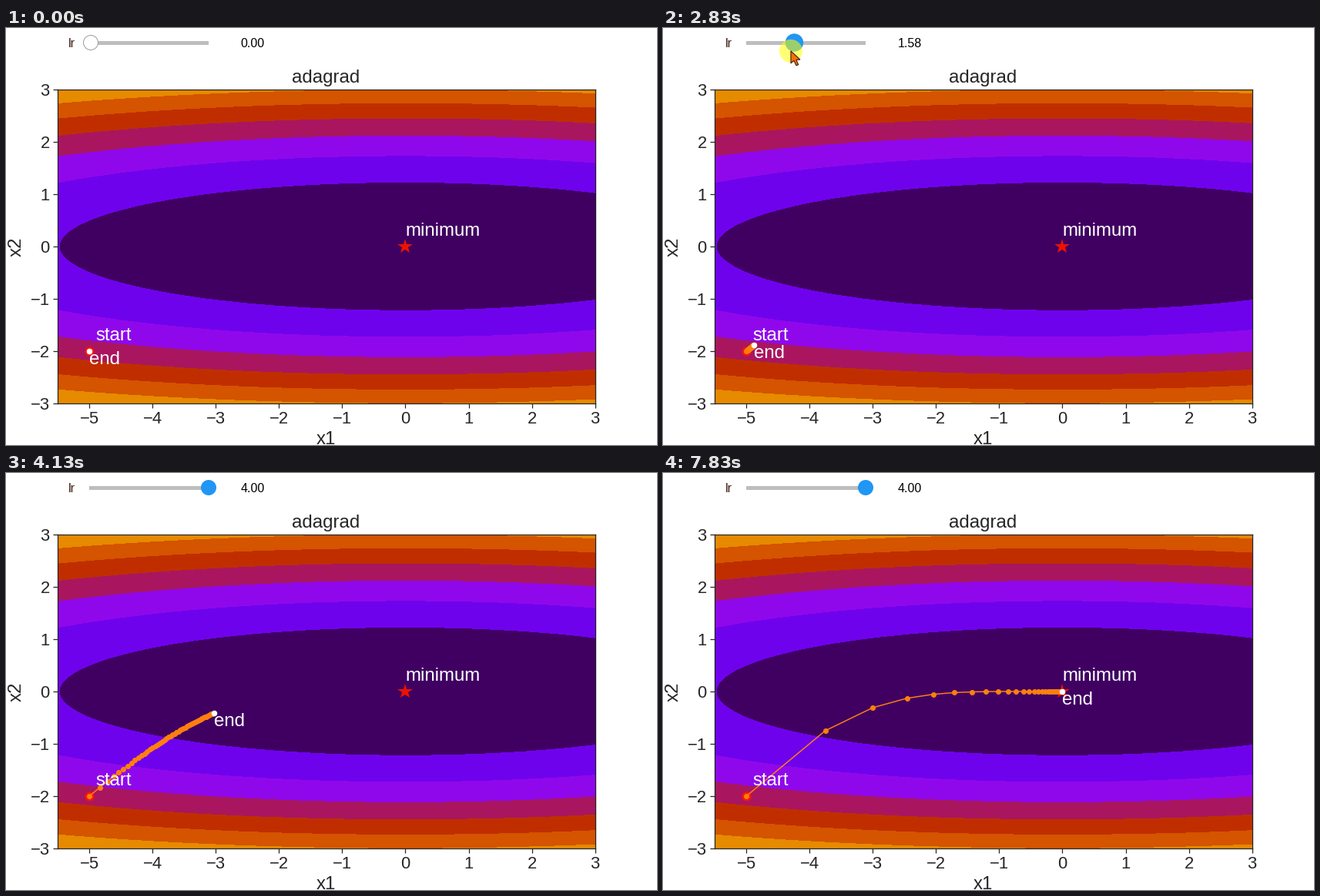
A matplotlib script for the animation above (8 s loop, 845 by 542 pixels).

```python
import numpy as np
import matplotlib.pyplot as plt
from matplotlib.animation import FuncAnimation
from matplotlib.patches import Circle, Polygon, Rectangle

W, H, DPI = 845, 542, 64
PT = 72 / DPI                      # points per pixel
STEP, FRAMES = 32, 250
INK = "#262626"
ORANGE = "#ff7f0e"
LEFT, RIGHT, TOP, BOTTOM = 67, 764.7, 79.5, 488.2

plt.rcParams["font.family"] = "Liberation Sans"
fig = plt.figure(figsize=(W / DPI, H / DPI), dpi=DPI, facecolor="white")

# Contour plot of the loss surface
ax = fig.add_axes([LEFT / W, 1 - BOTTOM / H, (RIGHT - LEFT) / W, (BOTTOM - TOP) / H])
gx, gy = np.meshgrid(np.linspace(-5.5, 3, 86), np.linspace(-3, 3, 61))
ax.contourf(gx, gy, 0.1 * gx**2 + 2 * gy**2, levels=np.arange(0, 25, 3), cmap="gnuplot")
ax.set(xlim=(-5.5, 3), ylim=(-3, 3), xticks=range(-5, 4), yticks=range(-3, 4))
ax.tick_params(length=6 * PT, width=1.25 * PT, pad=4.3 * PT, labelsize=22 * PT,
               color=INK, labelcolor=INK)
for spine in ax.spines.values():
    spine.set(color=INK, linewidth=1.25 * PT)

# Pixel-space layer for the labels, slider and pointer
ui = fig.add_axes([0, 0, 1, 1])
ui.set(xlim=(0, W), ylim=(H, 0))
ui.axis("off")


def label(x, y, text, size=24, color=INK, **kw):
    return ui.text(x, y, text, fontsize=size * PT, color=color, **kw)


def note(x, y, text):
    return ax.text(x, y, text, fontsize=24 * PT, color="white", zorder=6)


def marker(x, y, shape, size, color, zorder):
    return ax.plot([x], [y], shape, ms=size * PT, color=color, mew=0, zorder=zorder)[0]


label(415.5, 71.5, "adagrad", ha="center")
label(415.5, 541, "x1", ha="center")
label(20, 284.5, "x2", rotation=90, rotation_mode="anchor", ha="center")
label(81, 25, "lr", 16, "#402010")
value_text = label(304.5, 25, "", 16, "black")

marker(0, 0, "*", 20, "#ee1100", 2)
marker(-5, -2, "o", 12, "#fb1408", 3)
trace, = ax.plot([], [], "-o", color=ORANGE, lw=1.5 * PT, ms=6 * PT, mew=PT, zorder=4)
end_dot = marker(-5, -2, "o", 7.5, "white", 5)
note(0, 0.21, "minimum")
note(-4.9, -1.8, "start")
end_text = note(-5, -2.25, "end")

ui.add_patch(Rectangle((108, 17), 155, 4.6, fc="#bdbdbd", lw=0, zorder=1))
handle = ui.add_patch(Circle((110, 19), 9.5, lw=PT, zorder=2))
halo = ui.add_patch(Circle((0, 0), 15, fc="#ffff00", alpha=0.55, lw=0, zorder=5))
ARROW = np.array([(0, 0), (0, 16), (4, 12.6), (7, 19), (9.8, 17.8), (7, 11.6), (12, 11.2)])
pointer = ui.add_patch(Polygon(ARROW, closed=True, ec="#301008", lw=PT, zorder=6))

# Pointer path: time, x, y
PATH = np.array([
    (910, 85, -18), (1250, 90, 4), (1660, 97, 15), (1760, 99, 15), (1890, 104, 15),
    (2110, 104, 15), (2400, 118, 20), (2830, 164, 30), (3250, 246, 24),
    (3670, 312, 20), (3730, 318, 21), (3980, 785, 45)])

# The plot lags behind the slider: time of each redraw and its learning rate
REDRAWS = np.array([
    (0, 0), (2590, .01), (2890, .03), (3120, .05), (3380, .08), (3640, .11), (3890, .14),
    (4125, .17), (4365, .21), (4645, .24), (4905, .34), (5215, .37), (5475, .46),
    (5725, .56), (5965, .62), (6255, .66), (6515, .74), (6765, .84), (7045, .94),
    (7285, 1.04), (7565, 1.15), (7825, 1.25)])


def adagrad(rate, steps=50):
    point, total = np.array([-5.0, -2.0]), np.full(2, 1e-6)
    points = [point]
    for _ in range(steps):
        grad = point * (0.2, 4)
        total = total + grad**2
        point = point - rate * grad / np.sqrt(total)
        points.append(point)
    return np.array(points)


def update(i):
    t = i * STEP + 24
    px = np.interp(t, PATH[:, 0], PATH[:, 1])
    py = np.interp(t, PATH[:, 0], PATH[:, 2])
    pressed = 2110 <= t < 3730

    pointer.set_visible(910 <= t < 3990)
    pointer.set_xy(ARROW + (px, py))
    pointer.set_facecolor("#f07010" if pressed else "#dc1414")
    halo.set_visible(pressed)
    halo.center = px, py

    lr = np.clip((px - 105.5) / 153 * 4, 0, 4)
    value_text.set_text(f"{lr:.2f}")
    active = t >= 1740
    handle.center = 110 + lr / 4 * 153, 19
    handle.set_radius(11.7 if pressed else 10 if active else 9.5)
    handle.set_facecolor("#2196f3" if active else "white")
    handle.set_edgecolor("none" if active else "#9e9e9e")

    rate = REDRAWS[REDRAWS[:, 0] <= t][-1, 1]
    points = adagrad(rate)
    x, y = points[-1]
    trace.set_data(points[:, 0], points[:, 1])
    end_dot.set_data([x], [y])
    end_text.set_position((x, y - 0.25))
    return trace, end_dot, end_text, value_text, handle, halo, pointer


anim = FuncAnimation(fig, update, frames=FRAMES, interval=STEP, repeat=True, repeat_delay=0)
plt.show()
```
